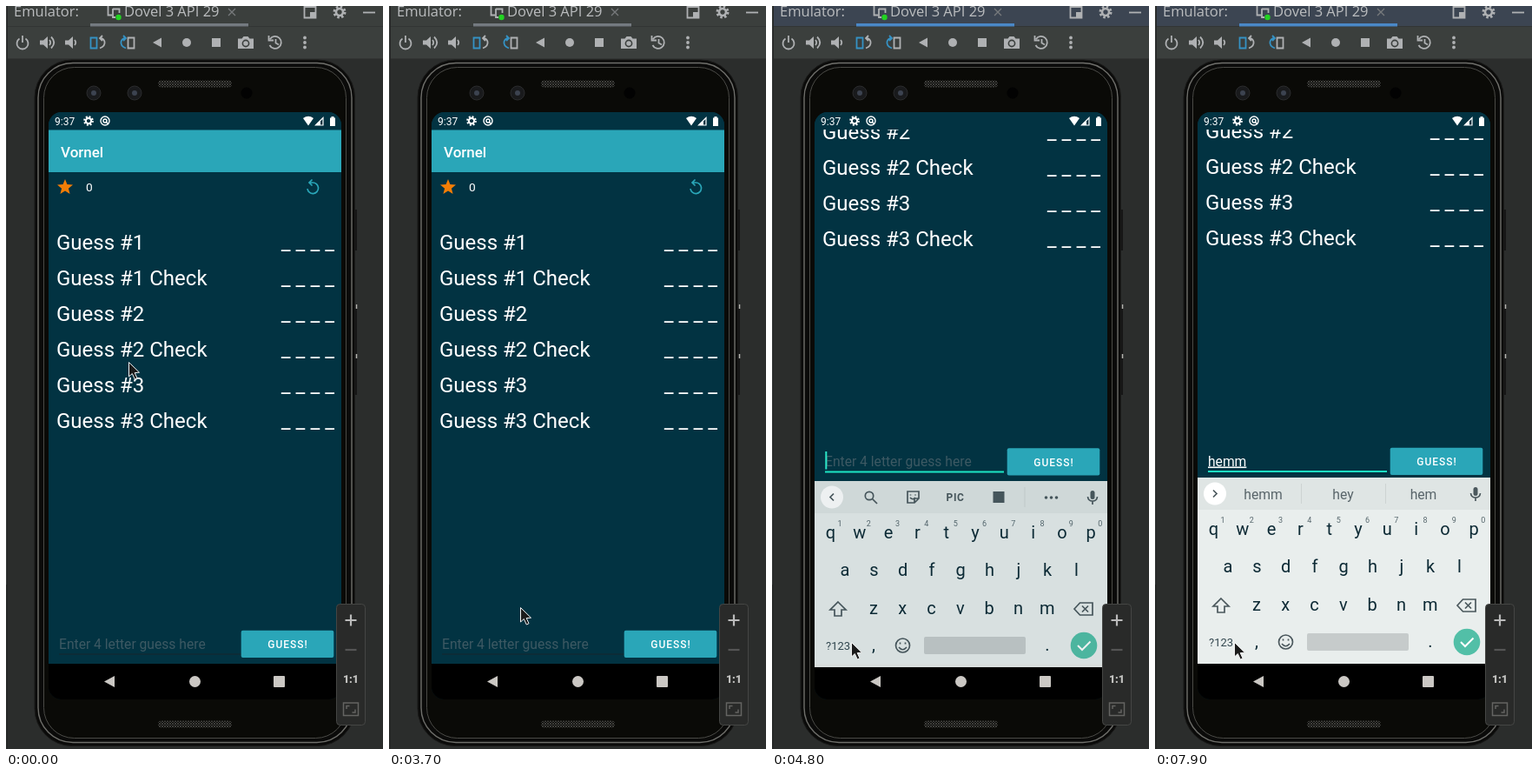
An HTML page that plays this animation: 434x854 px, repeating every 8 s.

```html
<!DOCTYPE html>
<html lang="en">
<head>
<meta charset="utf-8">
<title>Word game in an emulator</title>
<style>
html, body { margin: 0; width: 100%; height: 100%; overflow: hidden; background: #2b2d2c; }
svg { display: block; font-family: Roboto, sans-serif; }
text { white-space: pre; }
.ui { font: 16.5px "Open Sans", sans-serif; fill: #bbbdbf; }
.line { fill: none; stroke: #afb1b3; stroke-width: 1.8; }
.fill { fill: #afb1b3; }
.blue { stroke: #3592c4; }
.mid { text-anchor: middle; }
.key { font-size: 20px; fill: #0d2a35; text-anchor: middle; }
.digit { font-size: 9px; fill: #57676d; text-anchor: middle; }
.keyIcon { fill: none; stroke: #4b585d; stroke-width: 1.7; }
.keyFill { fill: #4b585d; }
.word { font-size: 15.7px; fill: #59656a; text-anchor: middle; }
</style>
</head>
<body>
<svg width="434" height="854" viewBox="0 0 434 854">
  <defs>
    <clipPath id="screenClip"><rect x="49" y="122" width="337" height="675" rx="15"/></clipPath>
    <pattern id="mesh" width="3" height="3" patternUnits="userSpaceOnUse">
      <path d="M0 0L3 3M3 0L0 3" stroke="#4a4a47" stroke-width=".8"/>
    </pattern>
    <g id="gear" fill="none" stroke="currentColor">
      <circle r="6" stroke-width="3" stroke-dasharray="2.4 2.31"/>
      <circle r="4" stroke-width="2.6"/>
    </g>
  </defs>

  <!-- Tool window -->
  <rect width="434" height="854" fill="#2b2d2c"/>
  <rect id="titleBar" width="434" height="24"/>
  <rect y="23" width="434" height="1" fill="#323534"/>
  <rect id="tabLine" x="97" y="20" width="182" height="3.5"/>
  <rect y="24" width="434" height="36" fill="#3b3f3d"/>
  <rect y="60" width="434" height="1" fill="#323433"/>
  <path d="M.5 0V665" stroke="#3b3f3d"/>
  <path d="M1.5 0V854" stroke="#242525"/>
  <text class="ui" x="9" y="12">Emulator:</text>
  <text class="ui" x="136" y="12">Dovel 3 API 29</text>
  <path class="line" d="M117.5 0V10.5H122M123 3.5H130.5V8M123 3V13H126"/>
  <circle cx="129.5" cy="13" r="3.2" fill="#22d322"/>
  <path d="M256 3L264 11M264 3L256 11" stroke="#777a7c" stroke-width="1.3"/>
  <path class="line" d="M343.5 1H356.5V13.5H343.5Z"/>
  <rect class="fill" x="350" y="7" width="7" height="7"/>
  <use href="#gear" x="384" y="7" color="#afb1b3"/>
  <path class="line" d="M411 7.5H425"/>

  <g id="toolbar">
    <path class="line" d="M15.5 37.5A6.5 6.5 0 1 0 22.5 37.5M19 34V42"/>
    <path class="fill" d="M39 39.5H43L48 35V49L43 44.5H39ZM68 39.5H72L77 35V49L72 44.5H68Z"/>
    <path class="line" d="M50 39Q52.5 42 50 45M52 35.5Q58.5 42 52 48.5M79 39Q81.5 42 79 45"/>
    <path class="line blue" d="M97.5 36.5H104.5V48.5H97.5Z"/>
    <path class="line" d="M108 48.5Q114.500 46 113.500 41Q112.500 37 108 37M111 34L108 37L111 40"/>
    <path class="line" d="M140.5 36.5H147.5V48.5H140.5Z"/>
    <path class="line blue" d="M138 48.5Q131.5 46 132.5 41Q133.5 37 138 37M135 34L138 37L135 40"/>
    <path class="fill" d="M169 42L179 36.5V47.5Z"/>
    <circle class="fill" cx="208" cy="42" r="5"/>
    <rect class="fill" x="237" y="37" width="10" height="10"/>
    <path class="fill" d="M267 37.5H271.5L273.5 35H278.5L280.5 37.5H285V49H267Z"/>
    <circle cx="276" cy="43" r="3.6" fill="none" stroke="#3b3f3d" stroke-width="1.6"/>
    <path class="line" d="M304 38A7 7 0 1 1 303.5 45M302.5 34V39.5H308M310.5 38V42.5L314 44.5"/>
    <g class="fill"><circle cx="344" cy="36.5" r="1.9"/><circle cx="344" cy="42" r="1.9"/><circle cx="344" cy="47.5" r="1.9"/></g>
  </g>

  <!-- Phone body -->
  <path d="M402.500 234V281M402.500 343V447" stroke="#161616" stroke-width="3"/>
  <path d="M403.500 343V348M403.500 400V405" stroke="#b5b5b0" stroke-width="1.5"/>
  <rect x="33" y="62" width="368.500" height="788.500" rx="43" fill="#0b0b0a" stroke="#1a1a19"/>
  <rect x="37" y="65.500" width="361" height="781" rx="40" fill="none" stroke="#6f6f6b" stroke-width="1.4"/>
  <rect x="43.500" y="70.500" width="348" height="771" rx="35" fill="#0a0a07" stroke="#4a4a46"/>
  <rect x="175" y="85.5" width="85" height="8" rx="4" fill="url(#mesh)"/>
  <rect x="175" y="821.5" width="85" height="8" rx="4" fill="url(#mesh)"/>
  <g fill="#191a1c" stroke="#2b2c2d"><circle cx="101" cy="100" r="8"/><circle cx="148" cy="100" r="8"/></g>
  <g fill="#3c4350"><circle cx="101" cy="100" r="3"/><circle cx="148" cy="100" r="3"/></g>
  <circle cx="277" cy="100" r="6.5" fill="#020202"/>

  <!-- Screen -->
  <g clip-path="url(#screenClip)">
    <rect x="49" y="122" width="337" height="675" fill="#023342"/>
    <g id="content">
      <rect x="49" y="142.5" width="337" height="48.5" fill="#2aa6b8"/>
      <text x="63" y="174" font-size="17" font-weight="500" fill="#fff">Vornel</text>
      <path d="M68 199L70.4 205.1L77 205.5L71.9 209.7L73.6 216L68 212.4L62.4 216L64.1 209.7L59 205.5L65.6 205.1Z" fill="#f27d06"/>
      <text x="92" y="212.5" font-size="13.7" fill="#fff">0</text>
      <path d="M347 210A6.3 6.3 0 1 0 353 203H349M352.5 199.5L349 203L352.5 206.5" fill="none" stroke="#2aa6b8" stroke-width="1.7"/>
      <g id="rows" font-size="24" fill="#fff"></g>
      <rect id="fieldLine" x="61"/>
      <text id="hint" x="61" y="738.5" font-size="15.65" fill="#3d5963">Enter 4 letter guess here</text>
      <text id="typed" x="61" y="738.5" font-size="15.65" fill="#fff" text-decoration="underline"></text>
      <rect id="caret" y="721.5" width="2" height="20.5" fill="#2ae6c8"/>
      <rect x="270.700" y="717.700" width="106.600" height="31.300" rx="2" fill="#2aa6b8"/>
      <text class="mid" x="324.5" y="738" font-size="12" font-weight="500" letter-spacing="1" fill="#fff">GUESS!</text>
    </g>

    <rect x="49" y="122" width="337" height="20" fill="#023342"/>
    <text x="56" y="137" font-size="12" fill="#fff">9:37</text>
    <use href="#gear" transform="translate(95 132) scale(.78)" color="#fff"/>
    <g fill="none" stroke="#fff" stroke-width="1.4"><circle cx="114" cy="132" r="5"/><circle cx="114" cy="132" r="2"/><path d="M115 133L118 136"/></g>
    <path d="M342 129Q348 124.5 354 129L348 137.5ZM373 128.5H374.5V127H377.5V128.5H379V138H373Z" fill="#fff"/>
    <path d="M365 128.500V137H356.500Z" fill="none" stroke="#fff" stroke-width="1.2"/>
    <path d="M362 131V137H356Z" fill="#fff"/>

    <rect x="49" y="756" width="337" height="41" fill="#000"/>
    <g id="keyboard">
      <rect x="49" y="542" width="337" height="214" fill="#e9eeed"/>
      <rect id="keyboardTail" x="49" y="756" width="337" height="60" fill="#e9eeed"/>
      <rect x="49" y="542" width="337" height="37" fill="#dfe5e4"/>
      <circle cx="69" cy="560.5" r="13" fill="#fff"/>
      <path id="chevron" class="keyIcon"/>
      <g id="tools">
        <circle class="keyIcon" cx="112" cy="559" r="4.7"/><path class="keyIcon" d="M115.5 562.5L121 568"/>
        <path class="keyIcon" d="M156 554H169V562L164 567H156ZM169 562H164V567M159 561Q162 564.5 165 561M159.5 557.5V558.5M165 557.5V558.5"/>
        <text class="mid keyFill" x="211" y="565" font-size="12" font-weight="700" letter-spacing=".6">PIC</text>
        <rect class="keyFill" x="254.5" y="554" width="13" height="13"/>
        <path d="M291 549V572" stroke="#cdd3d2"/>
        <g class="keyFill"><circle cx="315.5" cy="561" r="1.8"/><circle cx="321.5" cy="561" r="1.8"/><circle cx="327.5" cy="561" r="1.8"/></g>
      </g>
      <g id="suggestions">
        <path d="M168.5 549V572M265.5 549V572" stroke="#cdd3d2"/>
        <text class="word" x="124.5" y="567"></text>
        <text class="word" x="216.5" y="567"></text>
        <text class="word" x="309" y="567"></text>
      </g>
      <rect class="keyFill" x="366.5" y="553" width="5" height="10" rx="2.5"/>
      <path class="keyIcon" d="M363.5 560Q364 565 369 565Q374 565 374.5 560M369 565V569"/>
      <g id="keys"></g>
      <path class="keyIcon" d="M76 681L85 690H80V697H72V690H67Z"/>
      <path class="keyIcon" d="M348 689L354.5 682H369V696H354.5ZM357 685.5L364 692.5M364 685.5L357 692.5"/>
      <text x="62" y="736" font-size="13" fill="#33474f">?123</text>
      <text class="key" x="117" y="737">,</text>
      <text class="key" x="317" y="737">.</text>
      <circle class="keyIcon" cx="150.5" cy="731" r="8"/>
      <path class="keyIcon" d="M146 733Q150.5 738.5 155 733M147.5 727.5V729.5M153.5 727.5V729.5"/>
      <rect x="175" y="721" width="117" height="20" rx="2" fill="#c6cbcb"/>
      <circle cx="359" cy="731" r="15.3" fill="#52bfa7"/>
      <path d="M352 731L357 736L366.5 726.5" fill="none" stroke="#fff" stroke-width="2"/>
    </g>
    <rect id="navCover" x="49" width="337" height="41" fill="#000"/>
    <g fill="#cbc8c4"><path d="M113 776.5L125 770V783Z"/><circle cx="217.5" cy="776.5" r="6.5"/><rect x="308" y="770" width="13" height="13" rx="1"/></g>
  </g>

  <!-- Zoom panel -->
  <rect x="380.5" y="687.5" width="33" height="139" rx="4" fill="#292a29" stroke="#454644"/>
  <path d="M390.5 706H403.5M397 699.5V712.5" stroke="#bbb" stroke-width="2.2"/>
  <path d="M390.5 740H403.5" stroke="#555" stroke-width="2.2"/>
  <text class="mid" x="397" y="778" font-size="12.5" font-weight="800" fill="#c4c4c2">1:1</text>
  <path d="M388.5 801H405.5V815.5H388.5ZM392 808V804.5H395.5M402 808.5V812H398.5" fill="none" stroke="#646462" stroke-width="1.5"/>

  <path id="pointer" d="M.5 .5V17L4.3 13.5L7.3 20L10 18.7L7.2 12.6L12.5 12.2Z" fill="#1b1b1b" stroke="#f2f2f2"/>
</svg>
<script>
const $ = id => document.getElementById(id);
const set = (id, attrs) => Object.entries(attrs).forEach(([name, value]) => $(id).setAttribute(name, value));
const show = (id, on) => { $(id).style.display = on ? '' : 'none'; };

// Each path point: time, x, y. Equal neighbours are rests.
const pointerPath = [
  [0, 141, 409], [300, 141, 409], [400, 142, 409], [500, 142, 409], [900, 101, 238],
  [1000, 101, 238], [1200, 86, 213], [1500, 86, 213], [1600, 102, 216], [1900, 189, 226],
  [2000, 189, 226], [2600, 350, 215], [2800, 350, 215], [2900, 350, 218], [3000, 350, 218],
  [3700, 151, 691], [3900, 114, 717], [4200, 91, 731], [8000, 91, 731]
];
const typing = [[0, ''], [6300, 'h'], [6500, 'he'], [7200, 'hem'], [7400, 'hemm']];
const predictions = [
  [0, ['', '', '']], [6300, ['h', 'hi', 'have']],
  [6600, ['he', 'hey', 'her']], [7400, ['hemm', 'hey', 'hem']]
];
// Time, keyboard drop, keyboard opacity, content scroll.
const opening = [
  [0, 0, 0, 0], [4700, 65, .57, 0], [4800, 4, .93, -209.5],
  [4900, 1, .98, -210], [5000, 0, 1, -210]
];
const caretTimes = [[4500, 5000], [5500, 6100], [6300, 7900]];
const latest = (steps, t) => steps.filter(step => step[0] <= t).pop();

function pointerAt(t) {
  const i = Math.max(1, pointerPath.findIndex(point => point[0] >= t));
  const [t0, x0, y0] = pointerPath[i - 1], [t1, x1, y1] = pointerPath[i];
  const k = (t - t0) / (t1 - t0);
  return [x0 + (x1 - x0) * k, y0 + (y1 - y0) * k].map(Math.round);
}

$('rows').innerHTML = Array.from({ length: 6 }, (_, i) => {
  const y = 280 + 41 * i;
  const label = `Guess #${(i >> 1) + 1}${i % 2 ? ' Check' : ''}`;
  return `<text x="58" y="${y}">${label}</text><text x="378" y="${y}" text-anchor="end">_ _ _ _</text>`;
}).join('');

$('keys').innerHTML = ['qwertyuiop', 'asdfghjkl', 'zxcvbnm'].map((letters, row) =>
  [...letters].map((letter, i) => {
    const x = [67.5, 84, 117][row] + 33.3 * i, y = 608 + 43.3 * row;
    const digit = row ? '' : `<text class="digit" x="${x + 10.5}" y="594">${(i + 1) % 10}</text>`;
    return `<text class="key" x="${x}" y="${y}">${letter}</text>${digit}`;
  }).join('')
).join('');

const words = document.querySelectorAll('.word');

function draw(time) {
  const t = Math.floor(time / 100) * 100;
  const active = t >= 4300, focused = t >= 4400;
  set('titleBar', { fill: active ? '#3c4552' : '#3b3f3d' });
  set('tabLine', { fill: active ? '#4a88c7' : '#747a80' });
  set('pointer', { transform: `translate(${pointerAt(t)})` });

  const [, drop, opacity, scroll] = latest(opening, t);
  set('content', { transform: `translate(0 ${scroll})` });
  set('keyboard', { transform: `translate(0 ${drop})`, opacity });
  show('keyboard', opacity > 0);
  show('keyboardTail', drop > 10);
  show('navCover', drop < 10);
  set('navCover', { y: 756 + drop });

  const text = latest(typing, t)[1];
  $('typed').textContent = text;
  show('hint', !text);
  set('fieldLine', focused
    ? { y: 744, width: 206, height: 2, fill: '#1de6c4' }
    : { y: 744.5, width: 210, height: 1, fill: '#17262c' });
  show('caret', caretTimes.some(([on, off]) => t >= on && t < off));
  set('caret', { x: 61.3 + (text ? $('typed').getComputedTextLength() : 0) });

  show('tools', !text);
  show('suggestions', text);
  set('chevron', { d: text ? 'M67 556.5L71 560.5L67 564.5' : 'M71 556.5L67 560.5L71 564.5' });
  latest(predictions, t)[1].forEach((word, i) => { words[i].textContent = word; });
}

const start = performance.now();
function tick() {
  draw((performance.now() - start) % 8000);
  requestAnimationFrame(tick);
}
tick();
</script>
</body>
</html>
```
